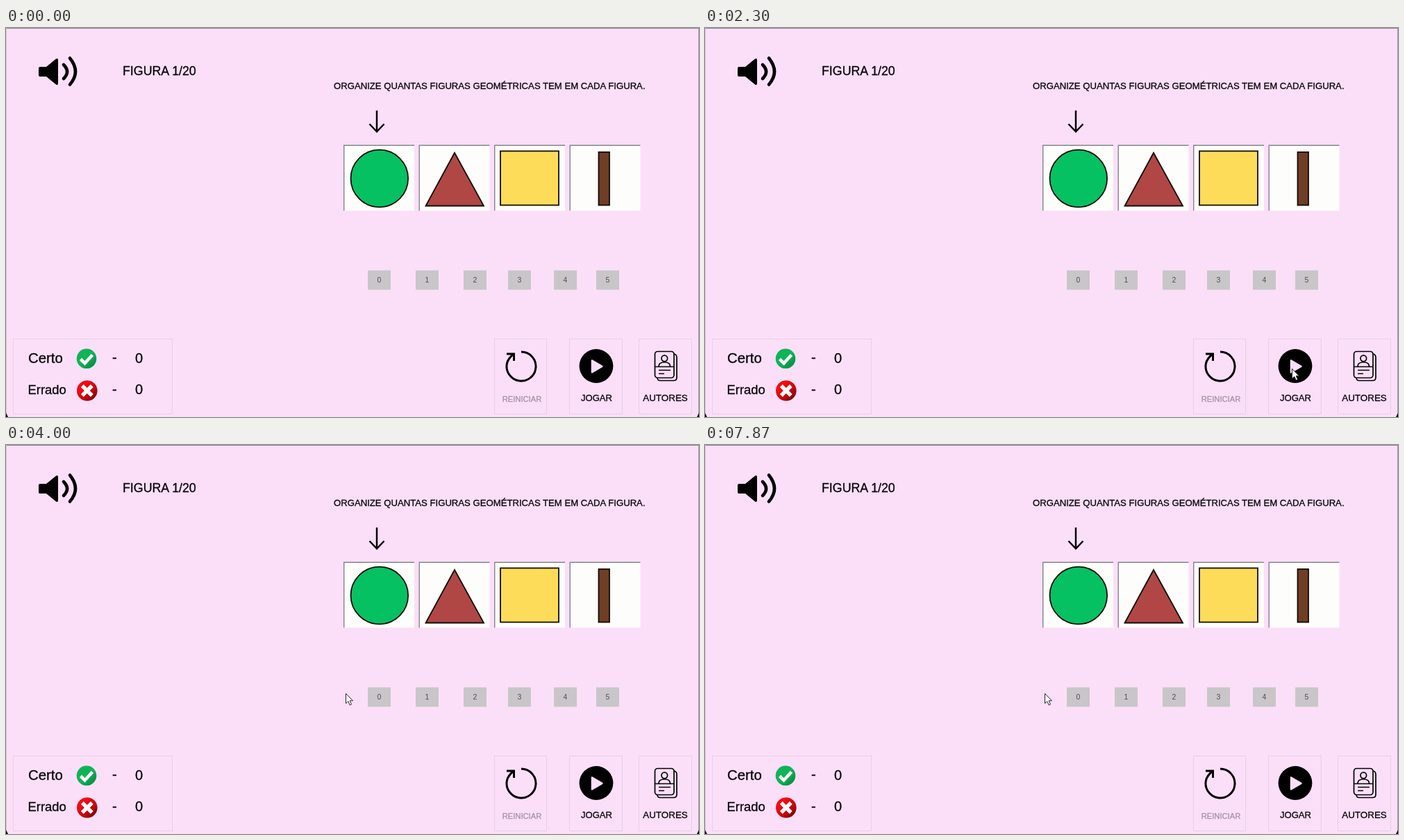
An HTML page for the animation above (8 s loop, 998 by 561 pixels).

```html
<!DOCTYPE html>
<html lang="pt">
<head>
<meta charset="utf-8">
<title>Figuras geométricas</title>
<style>
  html, body { margin: 0; width: 100%; height: 100%; overflow: hidden; background: #fbdff8; }
  svg { display: block; width: 100vw; height: 100vh; }
  text { font-family: "Liberation Sans", Arial, sans-serif; fill: #080408; stroke: #080408; stroke-width: .3; }
  .mid { text-anchor: middle; }
  .soft { fill: #a391a2; stroke: #a391a2; }
  .key { font-size: 10.5px; fill: #505050; stroke: none; text-anchor: middle; }
  .line { fill: none; stroke: #000; }
  .panel { fill: none; stroke: #e5d0e4; }
  .shape { stroke: #100c08; stroke-width: 1.8; }
</style>
</head>
<body>
<svg viewBox="0 0 998 561" xmlns="http://www.w3.org/2000/svg">
  <defs>
    <linearGradient id="ok" x2="1" y2="1">
      <stop offset=".5" stop-color="#10b457"/><stop offset="1" stop-color="#087f3c"/>
    </linearGradient>
    <linearGradient id="bad" x2="1" y2="1">
      <stop offset=".3" stop-color="#f00d12"/><stop offset=".65" stop-color="#bd080c"/><stop offset="1" stop-color="#4c0304"/>
    </linearGradient>
  </defs>
  <rect width="998" height="561" fill="#fbdff8"/>
  <path class="line" d="M0 .5H998" style="stroke:#8d7e8d"/>
  <path class="line" d="M997.5 0V561" style="stroke:#a796a6"/>
  <path class="line" d="M.5 0V561" style="stroke:#d9c2d7"/>
  <path d="M0 555V561H3ZM998 555V561H995Z"/>

  <g id="speaker">
    <path d="M49 56H58L72 44.5Q75 43 75 46V80Q75 83 72 81.500L58 70H49Q47 70 47 68V58Q47 56 49 56Z"/>
    <path class="line" d="M83 53Q93 63 83 73M92 43.500Q108 63 92 81.500" stroke-width="4.6" stroke-linecap="round"/>
  </g>
  <text x="168" y="68" font-size="17.8">FIGURA 1/20</text>
  <text x="472" y="87.500" font-size="13.150">ORGANIZE QUANTAS FIGURAS GEOMÉTRICAS TEM EM CADA FIGURA.</text>
  <path class="line" d="M534 119V149M523.500 138.500L534 149.500L544.500 138.500" stroke-width="2.5"/>

  <g id="cards"></g>
  <circle class="shape" cx="537.8" cy="217" r="41.3" fill="#05c162"/>
  <path class="shape" d="M646 180L688 256.500H604.500Z" fill="#b04745"/>
  <rect class="shape" x="712" y="177.500" width="84" height="78" fill="#fcdc59"/>
  <rect class="shape" x="853.500" y="179" width="15.500" height="76.500" fill="#703d25"/>
  <g id="keys"></g>

  <g id="panels"></g>
  <text x="32" y="482.500" font-size="20.4">Certo</text>
  <text x="31.500" y="528" font-size="18.4">Errado</text>
  <circle cx="116" cy="476.800" r="14.300" fill="url(#ok)"/>
  <path d="M107.500 477.500L113.500 483.500L124.500 471.500" fill="none" stroke="#fff" stroke-width="4.600"/>
  <circle cx="116.800" cy="523" r="14.800" fill="url(#bad)"/>
  <path d="M109.800 516L123.800 530M123.800 516L109.800 530" fill="none" stroke="#fff" stroke-width="5.400"/>
  <g font-size="20">
    <text x="153" y="482">-</text><text x="186" y="482.500">0</text>
    <text x="153" y="527.500">-</text><text x="186" y="527.500">0</text>
  </g>

  <path class="line" d="M742 467A21 21 0 1 1 721.500 483.500Q723 477 731 470M721 470H731.500V480" stroke-width="3"/>
  <text class="mid soft" x="743" y="539" font-size="11.200">REINICIAR</text>
  <circle cx="850" cy="487.500" r="24.400"/>
  <path d="M844 479.500V496.500L858.500 488Z" fill="#fbdff8" stroke="#fbdff8" stroke-width="2.500" stroke-linejoin="round"/>
  <text class="mid" x="850.500" y="538" font-size="13.100">JOGAR</text>
  <g class="line" stroke-width="1.700">
    <rect x="934.500" y="466.500" width="27.500" height="38" rx="4"/>
    <path d="M962 470Q966 471 966 475V504Q966 508.500 961.500 508.500H942Q938.500 508.500 938 505"/>
    <circle cx="948.300" cy="476.500" r="4.300"/>
    <path d="M940 488Q940 482 948.300 482Q956.500 482 956.500 488M934.500 488.500H962M940 493.500H957M940 498.500H948"/>
  </g>
  <text class="mid" x="949.500" y="538" font-size="13.400">AUTORES</text>

  <path id="cursor" d="M0 0V14.200L3.300 11.200L5.700 16.600L8 15.500L5.700 10.300H10Z" fill="#fff" stroke="#29232a" stroke-width="1"/>
</svg>
<script>
const LOOP = 8000;
const get = id => document.getElementById(id);
const box = (x, y, w, h, attrs) => `<rect x="${x}" y="${y}" width="${w}" height="${h}" ${attrs}/>`;

get("cards").innerHTML = [486, 594.5, 703, 811.5].map(x =>
  box(x, 168.5, 102, 95, 'fill="#fdfdfb"') +
  `<path d="M${x + .7} 263.500V169.200H${x + 102}" fill="none" stroke="#83808c" stroke-width="1.400"/>`
).join("");

get("keys").innerHTML = [521, 590, 659, 723, 789, 850].map((x, n) =>
  box(x, 349.5, 33, 28, 'fill="#c8c6c8"') +
  `<text class="key" x="${x + 16.5}" y="367">${n}</text>`
).join("");

get("panels").innerHTML = [[10.5, 229], [703.5, 75], [811.5, 76], [911.5, 76]]
  .map(([x, w]) => box(x, 448.5, w, 108, 'class="panel"')).join("");

// Pointer stops: time, x, y
const stops = [
  [1590, 419, 561], [1670, 429, 511], [1735, 461, 519], [1900, 575, 527],
  [2100, 760, 505], [2270, 845, 491], [2660, 845, 491], [2820, 760, 446],
  [3050, 585, 368], [3250, 501, 336], [3470, 501, 336], [3700, 489, 358]
];

function pointer(t) {
  if (t < stops[0][0]) return null;
  const i = stops.findIndex(s => s[0] > t);
  if (i < 0) return stops[stops.length - 1].slice(1);
  const [t0, x0, y0] = stops[i - 1], [t1, x1, y1] = stops[i];
  const k = (t - t0) / (t1 - t0);
  return [x0 + (x1 - x0) * k, y0 + (y1 - y0) * k];
}

const cursor = get("cursor");
function draw(t) {
  const p = pointer(t);
  cursor.style.display = p ? "" : "none";
  if (p) cursor.setAttribute("transform", `translate(${Math.round(p[0]) + .5} ${Math.round(p[1]) + .5})`);
}

const start = performance.now();
function tick() {
  draw((performance.now() - start) % LOOP);
  requestAnimationFrame(tick);
}
tick();
</script>
</body>
</html>
```
